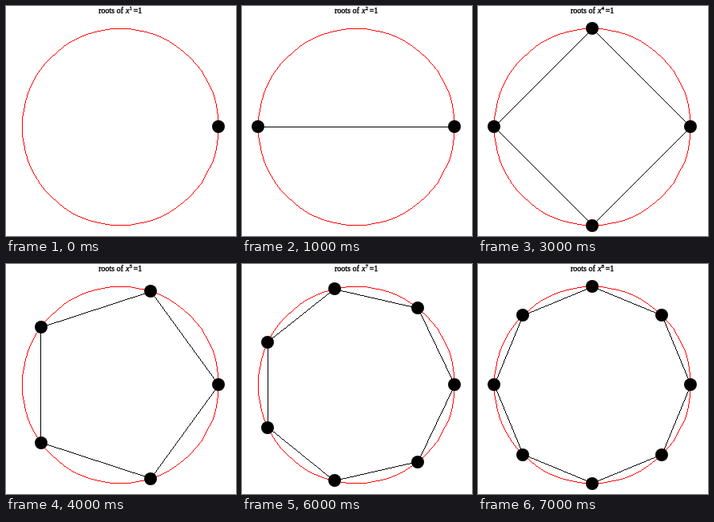
Write an HTML page that moves like this. It is 288 by 288 pixels and loops after 8 s.

```html
<!DOCTYPE html>
<html lang="en">
<head>
<meta charset="utf-8">
<title>Roots of unity</title>
<style>
  html, body { margin: 0; width: 100%; height: 100%; overflow: hidden; background: #fff; }
  svg { display: block; width: 288px; height: 288px; }
  text { font: 10px "Liberation Serif", Times, serif; stroke: #000; stroke-width: .35px; }
  #power { font-size: 7px; }
  path { fill: none; stroke-width: 1px; shape-rendering: crispEdges; }
</style>
</head>
<body>
<svg viewBox="0 0 288 288">
  <text x="116" y="9">roots of <tspan x="150" font-style="italic">x</tspan><tspan id="power" x="154.5" y="5">1</tspan><tspan x="159.5" y="9">=1</tspan></text>
  <path id="circle" stroke="#f00"/>
  <path id="polygon" stroke="#000"/>
  <g id="dots"></g>
</svg>
<script>
const STEP = 1000, COUNT = 8;
const CX = 143.3, CY = 151.42, RADIUS = 123.15;
const [power, circle, polygon, dots] =
  ['power', 'circle', 'polygon', 'dots'].map(id => document.getElementById(id));
let shown = 0;

function roots(n) {
  return Array.from({ length: n }, (_, k) => {
    const angle = 2 * Math.PI * k / n;
    return [CX + RADIUS * Math.cos(angle), CY - RADIUS * Math.sin(angle)];
  });
}

// One-pixel line without smoothing, as a path of single pixels.
function pixelLine(from, to) {
  const [x0, y0] = from.map(Math.floor);
  const [x1, y1] = to.map(Math.floor);
  const steps = Math.max(Math.abs(x1 - x0), Math.abs(y1 - y0), 1);
  let path = '';
  for (let i = 0; i <= steps; i++) {
    const x = Math.round(x0 + (x1 - x0) * i / steps);
    const y = Math.round(y0 + (y1 - y0) * i / steps);
    path += `M${x} ${y + 0.5}h1`;
  }
  return path;
}

function outline(points) {
  return points.map((p, i) => pixelLine(p, points[(i + 1) % points.length])).join('');
}

function show(n) {
  const points = roots(n);
  power.textContent = n;
  polygon.setAttribute('d', outline(points));
  dots.innerHTML = points.map(([x, y]) =>
    `<circle cx="${Math.round(x)}" cy="${Math.round(y)}" r="8"/>`).join('');
  shown = n;
}

function tick() {
  const n = Math.floor(performance.now() / STEP) % COUNT + 1;
  if (n !== shown) show(n);
  requestAnimationFrame(tick);
}

circle.setAttribute('d', outline(roots(72)));
tick();
</script>
</body>
</html>
```
